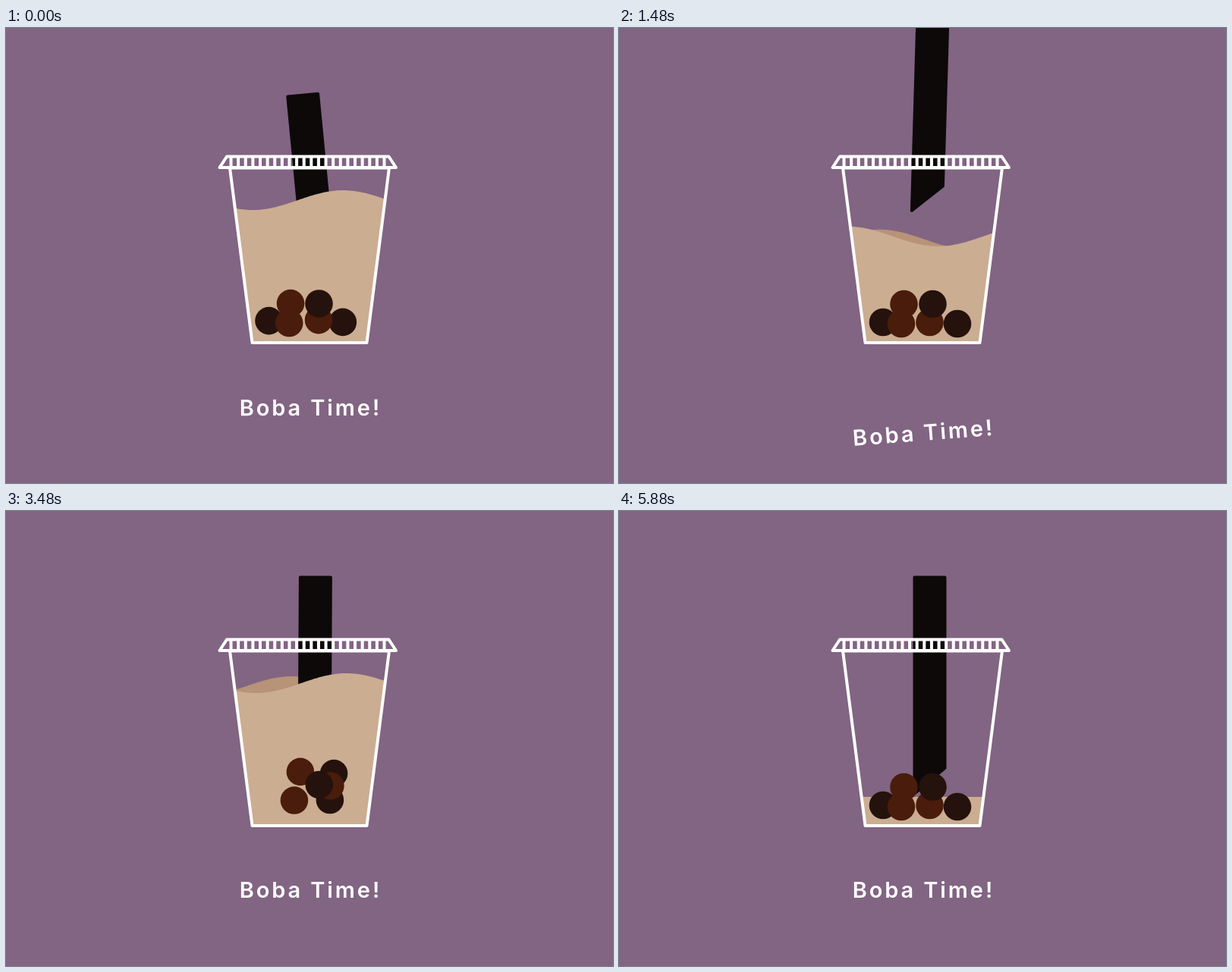
An HTML page with a canvas for the animation above (5.92 s loop, 800 by 600 pixels).

```html
<!DOCTYPE html>
<html lang="en">
<head>
<meta charset="utf-8">
<title>Boba Time!</title>
<style>
  html, body { margin: 0; width: 100%; height: 100%; overflow: hidden; background: #826483; }
  canvas { display: block; }
</style>
</head>
<body>
<canvas id="stage" width="800" height="600"></canvas>
<script>
const ctx = document.getElementById('stage').getContext('2d');
const LOOP = 5920, POSTER_TIME = 2036;
const POUR = 850, TURN = 2304, POKE = 2200;
const WAVE = 238, AMP = 13;
const DARK = '#25120d', BROWN = '#4a1c0b';
const CUP = [[295, 184.5], [505, 184.5], [475.5, 415], [324.5, 415]];
const LID = [[291, 169.5], [504.5, 169.5], [514, 184], [281.5, 184]];
const LEVEL = [[POUR, 427], [1480, 275], [1680, 227], [4979, 227], [5880, 364]];

// Back to front. dx and dy weigh one and two swings of the stir; poke is the push from the straw.
const BALLS = [
  { color: DARK, x: 348, y: 388, dx: [72, -51], dy: [-38, 17], poke: [5, -21] },
  { color: DARK, x: 446, y: 390, dx: [-24, -19], dy: [-9, 0], poke: [23, -20] },
  { color: BROWN, x: 409.5, y: 388, dx: [21, 12], dy: [-27, -5], poke: [-4, -7] },
  { color: BROWN, x: 372, y: 390, dx: [10, 8], dy: [-9, -2], poke: [-6, -2] },
  { color: BROWN, x: 375.5, y: 364, dx: [10, -10], dy: [-20, 1], poke: [2, 4] },
  { color: DARK, x: 413.5, y: 364, dx: [-3, -9], dy: [-4, -4], poke: [4, 3] }
];

const rad = deg => deg * Math.PI / 180;
const unit = (t, from, to) => Math.min(1, Math.max(0, (t - from) / (to - from)));

function ramp(t, from, to) {
  const u = unit(t, from, to);
  return u * u * (3 - 2 * u);
}

// Rises to 1 at mid and falls back, zero outside mid ± half.
const pulse = (t, mid, half) => Math.sin(Math.PI * unit(t, mid - half, mid + half)) ** 2;

function linear(keys, t) {
  const i = Math.max(1, keys.findIndex(key => t <= key[0]));
  const [a, p] = keys[i - 1], [b, q] = keys[i];
  return p + (q - p) * unit(t, a, b);
}

// Vertical offset of something that falls into place and bounces once.
function drop(t, start, dist, fall, height) {
  const u = Math.max(0, (t - start) / fall);
  if (u < 1) return -(1 - u * u) * dist;
  const v = unit(u, 1, 1.55);
  return -4 * height * v * (1 - v);
}

function outline(points) {
  ctx.beginPath();
  points.forEach(([x, y]) => ctx.lineTo(x, y));
  ctx.closePath();
}

function placed(x, y, tilt, draw) {
  ctx.save();
  ctx.translate(x, y);
  ctx.rotate(rad(tilt));
  draw();
  ctx.restore();
}

function liquid(color, surface) {
  ctx.save();
  outline(CUP);
  ctx.clip();
  ctx.beginPath();
  ctx.moveTo(290, 420);
  for (let x = 290; x <= 510; x += 2) ctx.lineTo(x, surface(x));
  ctx.lineTo(510, 420);
  ctx.fillStyle = color;
  ctx.fill();
  ctx.restore();
}

const swell = d => AMP * Math.cos(2 * Math.PI * d / WAVE);

// Both waves slide across, turn back together and leave a flat surface behind.
function backLiquid(t, level) {
  const crest = 374 + (t < TURN ? 0.252 : 0.204) * Math.abs(t - TURN);
  const start = crest - 1.5 * WAVE;
  const base = level + 4 + Math.max(0, (1300 - t) * 0.05);
  liquid('#b79377', x => base + (x < start ? AMP : -swell(x - crest)));
}

function frontLiquid(t, level) {
  const end = 870 - 0.257 * Math.abs(t - TURN);
  liquid('#cbad91', x => level + (x < end ? swell(x - end) : AMP));
}

function straw(t) {
  const begun = ramp(t, 1500, 1900);
  const stir = begun * (1 - ramp(t, 4300, 5050));
  const tilt = 1.7 * (1 - begun) - 5.8 * stir * Math.cos(rad(0.575 * (t - 2067)));
  const x = 409.5 - 2.5 * stir + 2.9 * tilt;
  const y = 85.5 + drop(t, 1276, 400, 250, 8) - 18 * pulse(t, 1870, 150) + 15 * pulse(t, POKE, 200);
  placed(x, y, tilt, () => {
    outline([[-20, 2], [20, 2], [20, 253.5], [-20, 287]]);
    ctx.fillStyle = ctx.strokeStyle = '#0d0909';
    ctx.lineWidth = 4;
    ctx.fill();
    ctx.stroke();
  });
}

function balls(t) {
  const turn = Math.PI * unit(t, 1980, 4760);
  const push = pulse(t, POKE, 200);
  const stirred = ([one, two], poke) => one * Math.sin(turn) + two * Math.sin(2 * turn) + poke * push;
  BALLS.forEach(({ color, x, y, dx, dy, poke }, i) => {
    const fall = drop(t, 590 + 14 * i, y + 20, 200, 12);
    ctx.beginPath();
    ctx.arc(x + stirred(dx, poke[0]), y + stirred(dy, poke[1]) + fall, 18.3, 0, 2 * Math.PI);
    ctx.fillStyle = color;
    ctx.fill();
  });
}

function cup(t) {
  placed(0, drop(t, 60, 440, 280, 20), 0, () => {
    outline(CUP);
    ctx.lineWidth = 4;
    ctx.stroke();
  });
}

function lid(t) {
  const start = 1150, fall = 200;
  const tilt = -8 * (1 - unit(t, start, start + fall));
  placed(398, 177 + drop(t, start, 210, fall, 5), tilt, () => {
    ctx.translate(-398, -177);
    ctx.lineWidth = 4;
    outline(LID);
    ctx.stroke();
    ctx.beginPath();
    for (let i = 0; i < 22; i++) {
      const x = 296.5 + i * 9.62;
      ctx.moveTo(x, 170);
      ctx.lineTo(x, 184);
    }
    ctx.stroke();
  });
}

function label(t) {
  const age = t - 1380;
  if (age < 0) return;
  const rise = 150 * Math.exp(-0.008 * age) * Math.cos(0.0103 * age);
  placed(400, 500 + rise, -0.128 * rise, () => {
    ctx.font = '600 29px Inter, "Open Sans", sans-serif';
    ctx.letterSpacing = '2.9px';
    ctx.textAlign = 'center';
    ctx.fillStyle = '#fff';
    ctx.fillText('Boba Time!', 1.4, 10.3);
  });
}

function render(t) {
  ctx.fillStyle = '#826483';
  ctx.fillRect(0, 0, 800, 600);
  const level = linear(LEVEL, Math.min(t, 5880));
  if (t > POUR) backLiquid(t, level);
  straw(t);
  if (t > POUR) frontLiquid(t, level);
  balls(t);
  ctx.strokeStyle = '#fff';
  cup(t);
  lid(t);
  label(t);
}

ctx.lineJoin = 'round';
const began = performance.now();
function tick() {
  const t = (performance.now() - began) % LOOP;
  // The loop opens on a brief view of the finished drink.
  render(t < 40 ? POSTER_TIME : t);
  requestAnimationFrame(tick);
}
tick();
</script>
</body>
</html>
```
